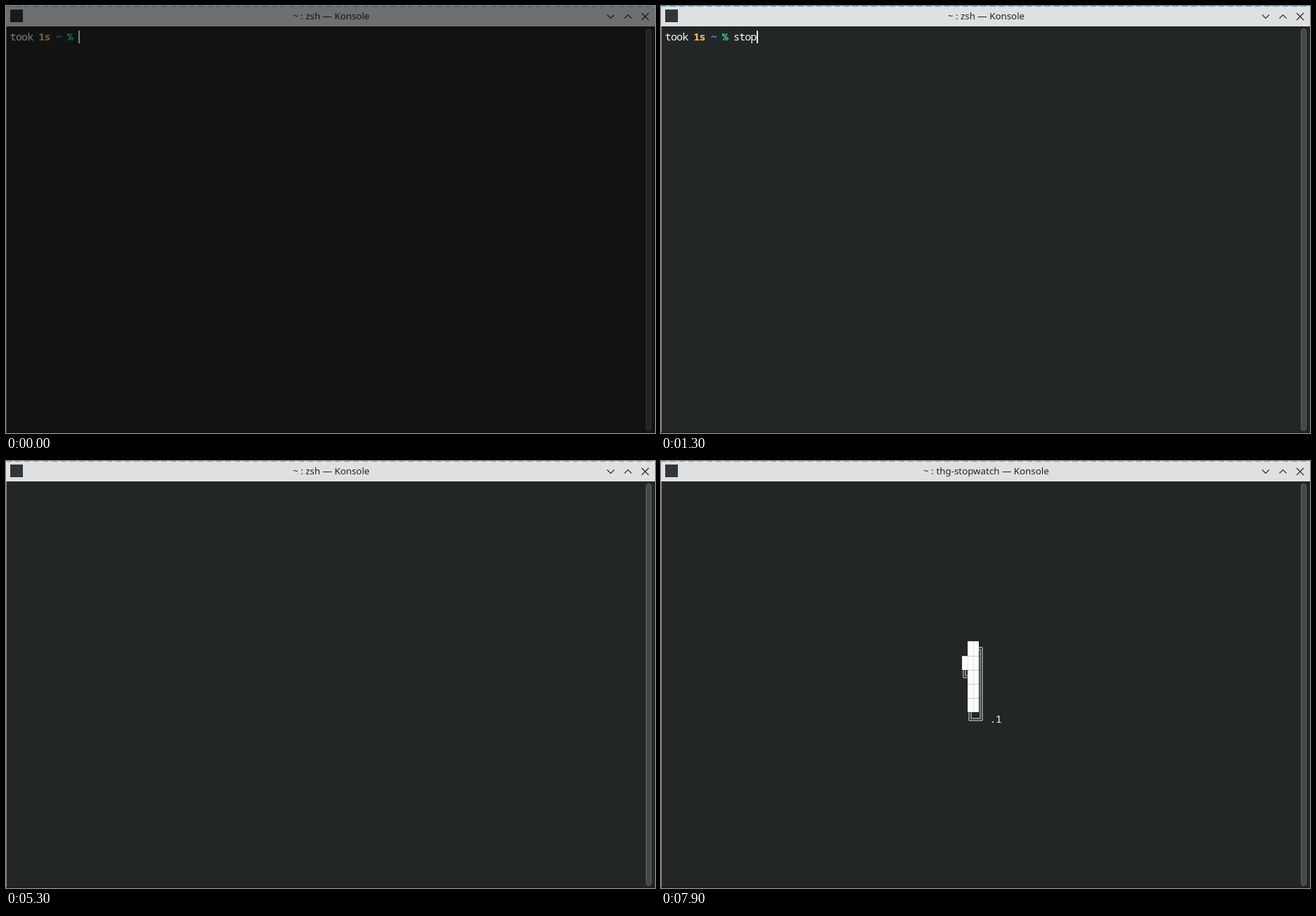
An HTML page with a canvas that plays this animation: 923x607 px, repeating every 8000 ms.

```html
<!DOCTYPE html>
<html lang="en">
<head>
<meta charset="utf-8">
<title>Terminal stopwatch</title>
<style>
  html, body { margin: 0; width: 100%; height: 100%; overflow: hidden; background: #232627; }
  canvas { display: block; }
</style>
</head>
<body>
<canvas id="stage" width="923" height="607"></canvas>
<script>
const ctx = document.getElementById('stage').getContext('2d');
const W = 923, H = 607, LOOP = 8000;
const LEFT = 6.3, TOP = 34.2, CELL_W = 8.1, CELL_H = 20.2;
const MONO = '"Noto Sans Mono", monospace';
const WHITE = '#fcfcfc', DARK = '#232627';

const COMMAND = 'stopwatch -style 3';
const KEY_TIMES = [800, 1100, 1200, 1300, 1400, 1600, 1700, 1900, 2100, 2200,
                   2800, 3500, 3500, 3700, 3900, 4000, 4100, 4200];
const CURSOR_OFF = [[2300, 2800], [3100, 3300], [4900, 5100]];
const CLEAR = 5300, RETITLE = 5400, START = 6300;

const DIGITS = [
  [' ██████╗ ', '██╔═████╗', '██║██╔██║', '████╔╝██║', '╚██████╔╝', ' ╚═════╝ '],
  [' ██╗', '███║', '╚██║', ' ██║', ' ██║', ' ╚═╝'],
];

function rect(x, y, w, h, color) {
  ctx.fillStyle = color;
  ctx.fillRect(x, y, w, h);
}

function line(points, color, width = 1) {
  ctx.strokeStyle = color;
  ctx.lineWidth = width;
  ctx.beginPath();
  points.forEach(([x, y]) => ctx.lineTo(x, y));
  ctx.stroke();
}

// One character per terminal cell
function print(text, col, row, color = WHITE, weight = 400) {
  ctx.font = `${weight} 15px ${MONO}`;
  ctx.fillStyle = color;
  ctx.textAlign = 'center';
  [...text].forEach((char, i) =>
    ctx.fillText(char, LEFT + (col + i + 0.5) * CELL_W, TOP + row * CELL_H + 15));
}

function drawBlock(x, y) {
  const x0 = Math.round(x), y0 = Math.round(y);
  const w = Math.round(x + CELL_W) - x0, h = Math.round(y + CELL_H) - y0;
  rect(x0, y0, w, h, WHITE);
  rect(x0, y0, 1, h, '#e2e2e2');
  rect(x0, y0, w, 1, '#c8c8c8');
}

function drawDoubleLine(char, x, y) {
  const right = x + CELL_W, bottom = y + CELL_H;
  const cx = Math.floor(x + CELL_W / 2) + 0.5, cy = Math.floor(y + CELL_H / 2) + 0.5;
  for (const d of [-1.5, 1.5]) {
    const paths = {
      '║': [[cx + d, y], [cx + d, bottom]],
      '═': [[x, cy + d], [right, cy + d]],
      '╔': [[right, cy + d], [cx + d, cy + d], [cx + d, bottom]],
      '╗': [[x, cy - d], [cx + d, cy - d], [cx + d, bottom]],
      '╚': [[right, cy - d], [cx + d, cy - d], [cx + d, y]],
      '╝': [[x, cy + d], [cx + d, cy + d], [cx + d, y]],
    };
    line(paths[char], '#e4e5e5');
  }
}

function drawStopwatch(tenths) {
  const digit = Math.floor(tenths / 10);
  const rows = DIGITS[digit];
  const col = digit ? 52 : 49, row = 11;
  rows.forEach((cells, r) => [...cells].forEach((char, c) => {
    if (char === ' ') return;
    const x = LEFT + (col + c) * CELL_W, y = TOP + (row + r) * CELL_H;
    if (char === '█') drawBlock(x, y);
    else drawDoubleLine(char, x, y);
  }));
  print('.' + tenths % 10, col + rows[0].length + 1, row + 5);
}

function drawPrompt(t) {
  print('took', 0, 0);
  print('1s', 5, 0, '#fdbc4b', 700);
  print('~', 8, 0, '#3daee9', 700);
  print('%', 10, 0, '#1cdc9a', 700);
  const typed = KEY_TIMES.filter(time => time <= t).length;
  print(COMMAND.slice(0, typed), 12, 0);
  if (!CURSOR_OFF.some(([from, to]) => t >= from && t < to))
    rect(Math.round(LEFT + (12 + typed) * CELL_W - 0.4), 35, 2, 18, WHITE);
}

function drawWindow(title) {
  rect(0, 0, W, H, DARK);
  rect(0, 0, W, 29, '#dee0e2');
  for (let x = 0; x < W; x += 13) rect(x, 0, 8, 1, '#62aecb');
  rect(0, 29, 1, H - 29, '#8d9092');
  rect(0, H - 1, W, 1, '#1a1919');

  rect(6, 5, 18, 18, '#31363b');
  ctx.font = '13.33px "Noto Sans", sans-serif';
  ctx.textAlign = 'center';
  ctx.fillStyle = DARK;
  ctx.fillText(title, 462.5, 19);

  const ink = '#2b2e31';
  line([[855, 12.5], [860, 17.5], [865, 12.5]], ink, 1.2);
  line([[879.5, 17.5], [884.5, 12.5], [889.5, 17.5]], ink, 1.2);
  line([[904, 10], [914, 20]], ink, 1.2);
  line([[914, 10], [904, 20]], ink, 1.2);

  ctx.beginPath();
  ctx.roundRect(910.5, 32.5, 7, 571, 3.5);
  ctx.fillStyle = '#454849';
  ctx.fill();
  ctx.strokeStyle = '#636667';
  ctx.lineWidth = 1;
  ctx.stroke();
}

function elapsedTenths(t) {
  if (t < 6700) return 0;
  if (t < 6900) return 1;
  return Math.min(11, Math.floor((t - 6700) / 100));
}

function draw(t) {
  drawWindow(t < RETITLE ? '~ : zsh — Konsole' : '~ : thg-stopwatch — Konsole');
  if (t < CLEAR) drawPrompt(t);
  else if (t >= START) drawStopwatch(elapsedTenths(t));

  const shade = 0.5 - 0.13 * Math.floor(t / 100);
  if (shade > 0) rect(0, 0, W, H, `rgba(0, 0, 0, ${shade})`);
}

const startTime = performance.now();
function tick() {
  draw((performance.now() - startTime) % LOOP);
  requestAnimationFrame(tick);
}
tick();
</script>
</body>
</html>
```
